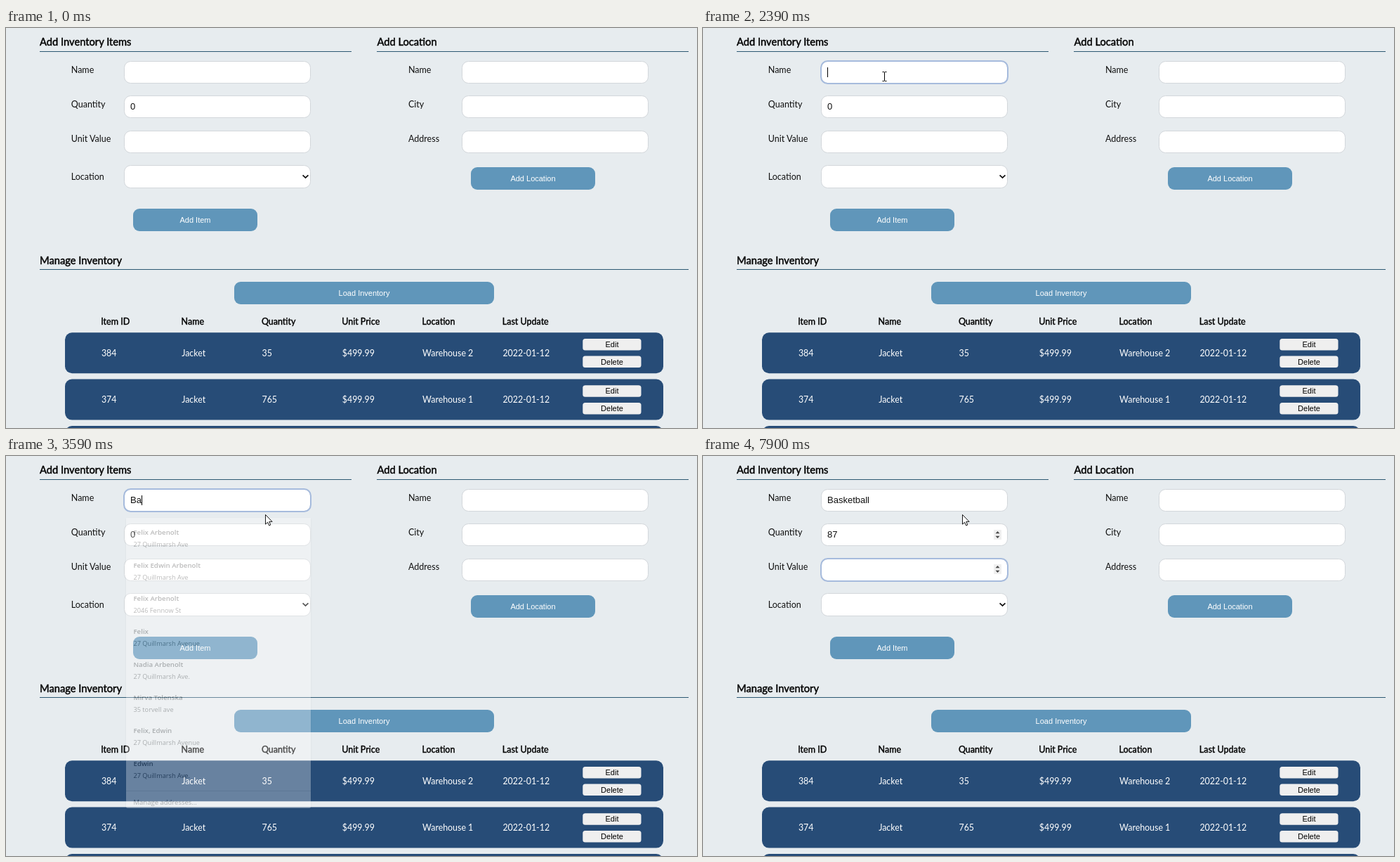
These frames come from a looping animation (984 px wide and 569 px high, 8 s). An HTML page:

```html
<!DOCTYPE html>
<html lang="en">
<head>
<meta charset="utf-8">
<title>Inventory</title>
<style>
  html, body { margin: 0; width: 100%; height: 100%; overflow: hidden; background: #e7ecef; }
  #stage { position: relative; width: 984px; height: 569px; overflow: hidden; }
  svg { position: absolute; left: 0; top: 0; }
  text { font: 12.5px Lato, "Open Sans", sans-serif; fill: #111; white-space: pre; }
  .head { font-size: 14.7px; fill: #000; stroke: #000; stroke-width: .45; }
  .col { fill: #000; stroke: #000; stroke-width: .4; }
  .cell { font-size: 12.4px; fill: #fff; }
  .btn, .small { font: 11px "Liberation Sans", Arial, sans-serif; text-anchor: middle; fill: #fff; }
  .small { fill: #000; }
  .value { font: 13px "Liberation Sans", Arial, sans-serif; }
  .rule { fill: #2c5872; }
  .field { fill: #fff; stroke: #d3d7db; }
  .blue { fill: #6096ba; }
  .row { fill: #274c77; }
  .chip { fill: #efefef; }
  #ring { fill: none; stroke: #a6bbdd; stroke-width: 2; }
  #popup {
    position: absolute; overflow: hidden; background: #fff; border-radius: 0 0 2px 2px;
    box-shadow: 0 1px 3px rgba(0, 0, 0, .2);
    font: 9.2px/16px "Open Sans", "Noto Sans", sans-serif; color: #222;
  }
  #popup * { position: absolute; left: 10px; margin: 0; white-space: nowrap; font-weight: 400; }
  #popup b { font-size: 9.7px; font-weight: 600; }
  #popup hr { left: 0; top: 388px; width: 100%; height: 1px; border: 0; background: #dadde0; }
  #popup i { top: 397px; font-size: 9.5px; font-style: normal; }
</style>
</head>
<body>
<div id="stage">
  <svg id="page" width="984" height="569"></svg>
  <div id="popup"></div>
  <svg width="984" height="569">
    <g id="cursor">
      <path id="beam" d="M-3-6.5H-.8L0-6 .8-6.5H3M0-6V6M-3 6.5H-.8L0 6 .8 6.5H3" fill="none" stroke="#000"/>
      <path id="arrow" d="M0 0V13.6L3.1 10.7 5.2 15.4 7.3 14.5 5.3 9.9H9.6Z" fill="#fff" stroke="#000" stroke-width=".9"/>
    </g>
  </svg>
</div>
<script>
const LOOP = 8000;
const $ = id => document.getElementById(id);

const text = (cls, x, y, s) => `<text class="${cls}" x="${x}" y="${y}">${s}</text>`;
const box = (cls, x, y, w, h, r = 0) =>
  `<rect class="${cls}" x="${x}" y="${y}" width="${w}" height="${h}" rx="${r}"/>`;
const field = (x, y, h = 31) => box('field', x + .5, y + .5, 265, h, 9);
const button = (x, y, w, s) => box('blue', x, y, w, 32, 9) + text('btn', x + w / 2, y + 19.7, s);
const spinner = (id, y) => `<g id="${id}" transform="translate(419.5 ${y})">
  <rect class="chip" x="-5.5" y="-7" width="11" height="14"/>
  <path d="M-3-1.7L0-5 3-1.7ZM-3 1.7L0 5 3 1.7Z" fill="#484848"/></g>`;

const colX = i => 135.3 + 114.3 * i;
const small = (y, s) => box('chip', 821.3, y, 83.2, 16.5, 3.5) + text('small', 863, y + 12, s);
const row = (y, cells) => box('row', 84, y, 852, 58, 10)
  + cells.map((s, i) => text('cell', colX(i) + .6, y + 33.8, s)).join('')
  + small(y + 8.7, 'Edit') + small(y + 33.3, 'Delete');

const price = '$499.99', date = '2022-01-12';
$('page').innerHTML = [
  text('head', 48, 25, 'Add Inventory Items'), box('rule', 48, 33, 444, 1),
  text('head', 528.5, 25, 'Add Location'), box('rule', 528, 33, 444, 1),
  text('head', 48, 335.5, 'Manage Inventory'), box('rule', 48, 343, 924, 1),
  ...['Name', 'Quantity', 'Unit Value'].map((s, i) => text('', 92.8, 64 + 49 * i, s) + field(168, [47, 96, 146][i])),
  ...['Name', 'City', 'Address'].map((s, i) => text('', 573, 64 + 49 * i, s) + field(649, [47, 96, 146][i])),
  text('', 92.8, 216, 'Location'), field(168, 195, 32),
  '<path d="M422.6 209.3l3.9 3.8 3.9-3.8" fill="none" stroke="#111" stroke-width="1.8"/>',
  button(181, 257, 177, 'Add Item'),
  button(662, 198, 177, 'Add Location'),
  button(325, 361, 370, 'Load Inventory'),
  ...['Item ID', 'Name', 'Quantity', 'Unit Price', 'Location', 'Last Update'].map((s, i) => text('col', colX(i), 422.3, s)),
  row(433.3, ['384', 'Jacket', '35', price, 'Warehouse 2', date]),
  row(499.6, ['374', 'Jacket', '765', price, 'Warehouse 1', date]),
  box('row', 84, 566, 852, 58, 10),
  spinner('spinQty', 112), spinner('spinUnit', 161),
  '<rect id="sel" x="177" y="105" width="7.3" height="14" fill="#3390ff"/>',
  '<text id="name" class="value" x="177" y="67"/><text id="qty" class="value" x="177" y="116.3"/>',
  '<rect id="ring" x="168" width="266" height="32" rx="9.5"/>',
  '<rect id="caret" width="1" height="14"/>'
].join('');

const people = [
  ['Felix Arbenolt', '27 Quillmarsh Ave'],
  ['Felix Edwin Arbenolt', '27 Quillmarsh Ave'],
  ['Felix Arbenolt', '2046 Fennow St'],
  ['Felix', '27 Quillmarsh Avenue'],
  ['Nadia Arbenolt', '27 Quillmarsh Ave.'],
  ['Mirva Tolenska', '35 torvell ave'],
  ['Felix, Edwin', '27 Quillmarsh Avenue'],
  ['Edwin', '27 Quillmarsh Ave.']
];
$('popup').innerHTML = people.map(([who, where], i) =>
  `<b style="top:${13 + 47 * i}px">${who}</b><span style="top:${30.3 + 47 * i}px">${where}</span>`
).join('') + '<hr><i>Manage addresses...</i>';

// When each letter of the name lands
const word = 'Basketball';
const keys = [3450, 3590, 3720, 4040, 4110, 4240, 4570, 4710, 5370, 5440];

// Pointer way points: time, x, y
const way = [
  [510, 938, 553], [1230, 188, 66], [1300, 194, 66], [1370, 208.5, 64.5], [1440, 224, 64],
  [1510, 240.5, 63.5], [1705, 240.5, 63.5], [1970, 258.5, 69], [2430, 258.5, 69], [2620, 369.5, 83.5]
];

const clamp = v => Math.min(1, Math.max(0, v));
const show = (id, on) => $(id).style.display = on ? '' : 'none';
const within = (t, spans) => spans.some(([a, b]) => t >= a && t < b);

function pointer(t) {
  const tick = 510 + Math.floor((t - 510) / 66.15) * 66.15;
  const i = way.findIndex(p => p[0] > tick);
  if (i < 0) return way[way.length - 1].slice(1);
  const [a, b] = [way[Math.max(0, i - 1)], way[i]];
  let k = clamp((tick - a[0]) / (b[0] - a[0] || 1));
  if (i === 1) k = k * k * (3 - 2 * k);
  return [a[1] + (b[1] - a[1]) * k, a[2] + (b[2] - a[2]) * k];
}

function popupAlpha(t) {
  if (t < 2460 || t >= 3720) return 0;
  if (t < 2650) return t < 2520 ? .3 : t < 2590 ? .65 : .9;
  return t < 3520 ? 1 : t < 3590 ? .65 : t < 3650 ? .3 : .08;
}

function draw(t) {
  const name = $('name'), qty = $('qty');
  name.textContent = word.slice(0, keys.filter(k => t >= k).length);
  qty.textContent = t < 6980 ? '0' : t < 7100 ? '8' : '87';

  const selected = t >= 5570 && t < 6980;
  show('sel', selected);
  qty.style.fill = selected ? '#fff' : '';
  show('spinQty', t >= 5570);
  show('spinUnit', t >= 7370);

  show('ring', t >= 2170);
  $('ring').setAttribute('y', t < 5570 ? 47 : t < 7370 ? 96 : 146);

  show('caret', within(t, [[2170, 2920], [3450, 5240], [5370, 5570], [6980, 7370], [7370, 7900]]));
  const active = t < 5570 ? name : t < 7370 ? qty : null;
  const typed = active && active.textContent ? active.getComputedTextLength() : 0;
  $('caret').setAttribute('x', Math.round(177 + typed));
  $('caret').setAttribute('y', t < 5570 ? 56 : t < 7370 ? 105 : 154);

  const alpha = popupAlpha(t), dx = (1 - alpha) * 6.4, dy = (1 - alpha) * 10;
  show('popup', alpha > 0);
  Object.assign($('popup').style, {
    opacity: alpha,
    left: 167 + dx + 'px', top: 81 + dy + 'px',
    width: 267.5 - dx + 'px', height: 421 - dy * 1.2 + 'px'
  });

  const [x, y] = pointer(t);
  const inField = x > 168 && x < 434 && y < 79;
  show('cursor', t >= 510);
  show('beam', inField);
  show('arrow', !inField);
  $('cursor').setAttribute('transform', `translate(${x} ${y})`);
}

const start = performance.now();
function frame() {
  draw((performance.now() - start) % LOOP);
  requestAnimationFrame(frame);
}
frame();
</script>
</body>
</html>
```
